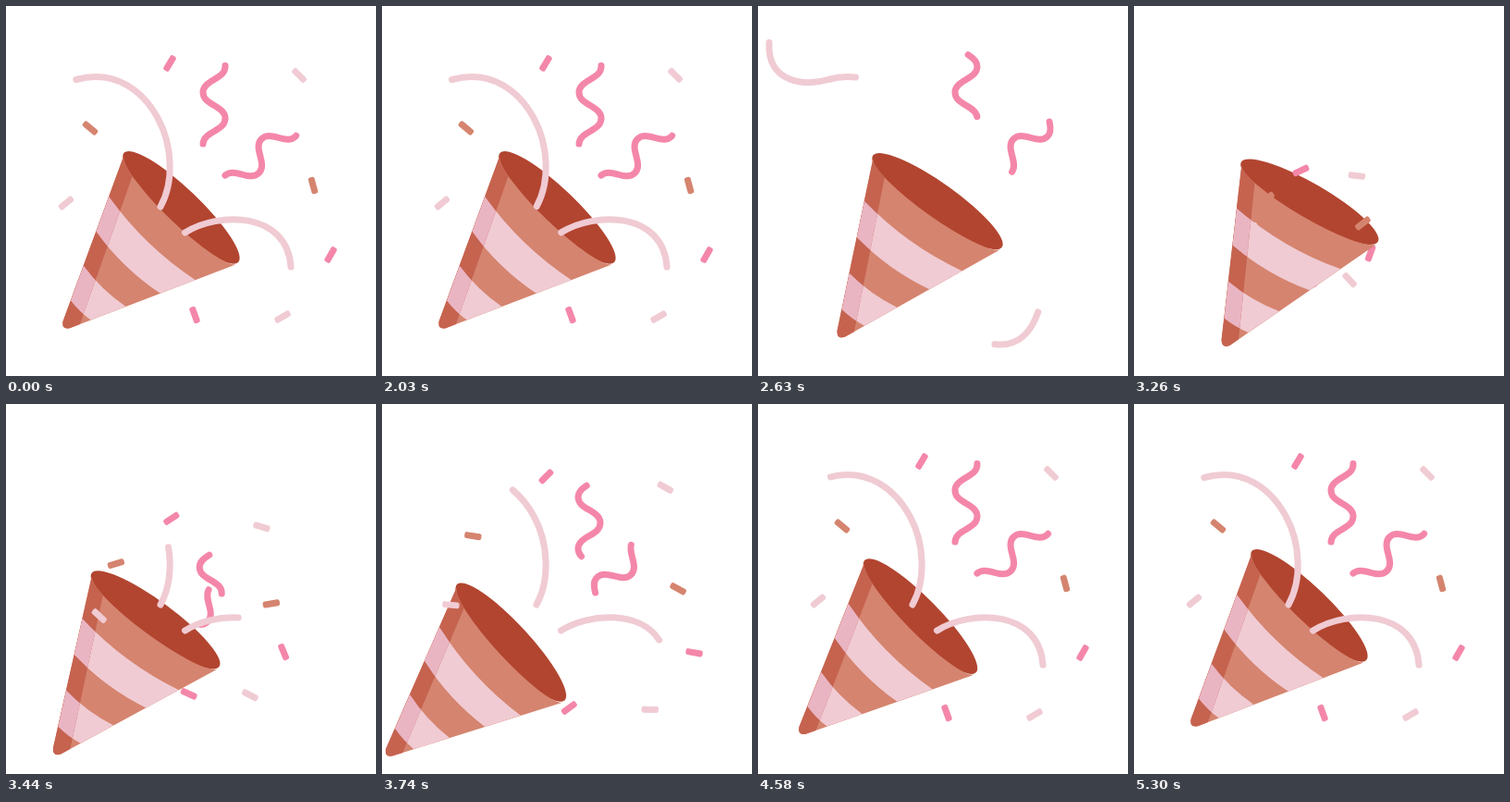
These frames come from a looping animation (400 by 400 pixels, 5330 ms). An HTML page:

```html
<!DOCTYPE html>
<html lang="en">
<head>
<meta charset="utf-8">
<title>Party popper</title>
<style>
  html, body { margin: 0; width: 100%; height: 100%; overflow: hidden; background: #fff; }
  svg { display: block; width: 100vw; height: 100vh; }
  .ribbon { fill: none; stroke-width: 7; stroke-linecap: round; stroke-linejoin: round; }
</style>
</head>
<body>
<svg viewBox="0 0 400 400">
  <defs>
    <clipPath id="body"><path d="M127.3 162 L61.5 341 Q60 350 69 348.3 L249 279.3 A85 16 43.8 0 1 127.3 162Z"/></clipPath>
    <clipPath id="side"><path d="M100 140 L152.2 140 L76 355 L40 355Z"/></clipPath>
    <path id="bands"/>
  </defs>
  <g class="cone"><ellipse cx="189.4" cy="217.8" rx="85.5" ry="19.8" transform="rotate(43.8 189.4 217.8)" fill="#b24530"/></g>
  <g id="mid"></g>
  <g class="cone">
    <g clip-path="url(#body)">
      <rect x="40" y="140" width="230" height="220" fill="#d5846f"/>
      <use href="#bands" fill="#f0cbd3"/>
      <g clip-path="url(#side)">
        <rect x="40" y="140" width="120" height="220" fill="#c5634f"/>
        <use href="#bands" fill="#eab5c3"/>
      </g>
    </g>
  </g>
  <g id="top"></g>
</svg>
<script>
const LOOP = 5330, EXIT = 2010, BURST = 3150;
const HOT = '#f487a9', PALE = '#f0cbd3', CLAY = '#d5846f';
const MOUTH = [183, 266];

const span = (t, a, b) => Math.max(0, Math.min(1, (t - a) / (b - a)));
const mix = (a, b, p) => a + (b - a) * p;
const smooth = u => u * u * (3 - 2 * u);
const easeOut = (u, n) => 1 - Math.pow(1 - u, n);
const settle = u => smooth(easeOut(u, 1.3));
// Distance still to fly and turn still to make after the burst
const flight = t => 0.57 * Math.pow((4500 - Math.min(t, 4500)) / 1240, 4);
const turn = t => Math.pow((4600 - Math.min(t, 4600)) / 1340, 2);

function add(parent, tag, attrs) {
  const el = document.createElementNS('http://www.w3.org/2000/svg', tag);
  for (const k in attrs) el.setAttribute(k, attrs[k]);
  document.getElementById(parent).appendChild(el);
  return el;
}

// Stripe edges: s is the share of the way from the tip to the rim
function edge(s) {
  const l = [61 + 66.3 * s, 343 - 181 * s], r = [67 + 182 * s, 349 - 69.7 * s];
  return { l, r, c: [(l[0] + r[0]) / 2 - 11 * s, (l[1] + r[1]) / 2 + 11.5 * s] };
}
document.getElementById('bands').setAttribute('d', [0.757, 0.344].map(s => {
  const a = edge(s), b = edge(s - 0.208);
  return `M${a.l} Q${a.c} ${a.r} L${b.r} Q${b.c} ${b.l}Z`;
}).join(' '));

function conePose(t) {
  const wind = smooth(span(t, EXIT, BURST));
  const kick = smooth(span(t, BURST, 3680)), back = settle(span(t, 3680, 5310));
  const tip = smooth(span(t, 3160, 3830)), level = settle(span(t, 3830, 5310));
  const x = 20 * wind - 73 * kick + 53 * back;
  const y = -2 * wind + 39.5 * kick - 37.5 * back;
  const angle = -14.8 * wind + 19.2 * tip - 4.4 * level;
  return `translate(${x} ${y}) rotate(${angle} 148 261)`;
}

// Show a window of a longer path: it grows to [a, b], later runs out at the end
function trim(el, a, b, enter, leave) {
  const total = el.getTotalLength();
  return t => {
    const into = t > 3240, p = into ? enter(t) : leave(t);
    const s = into ? a * p : mix(a, total, p);
    const e = into ? b * p : mix(b, total, p);
    el.style.display = e - s < 0.5 ? 'none' : '';
    el.setAttribute('stroke-dasharray', `${e - s} ${total * 2}`);
    el.setAttribute('stroke-dashoffset', -s);
  };
}

// Seven half waves; three of them are visible at rest
function squiggle(x, y, angle, enter) {
  let d = '';
  for (let i = -5; i <= 2; i++) {
    const px = i % 2 ? -24 : 0, py = -28 * i;
    d += i === -5 ? `M${px} ${py}` : `C${-24 - px} ${py + 14} ${px} ${py + 14} ${px} ${py}`;
  }
  const el = add('mid', 'path', { class: 'ribbon', stroke: HOT, d });
  const step = el.getTotalLength() / 7;
  const cut = trim(el, 2 * step, 5 * step, enter, t => Math.pow(span(t, EXIT, BURST), 2.6));
  return t => {
    const k = t > BURST ? 0.52 * flight(t) : 0;
    el.setAttribute('transform',
      `translate(${mix(x, MOUTH[0] + 30, k)} ${mix(y, MOUTH[1] - 30, k)}) rotate(${angle})`);
    cut(t);
  };
}

function streamer(rest, exit, enter, leave) {
  const el = add('top', 'path', { class: 'ribbon', stroke: PALE, d: rest });
  const len = el.getTotalLength();
  el.setAttribute('d', rest + exit);
  return trim(el, 0, len, enter, leave);
}

// The rest pose is the end of the flight; leaving pieces head just past the stage edge
function confetti(layer, color, x, y, angle, spin) {
  const el = add(layer, 'rect',
    { x: -9.2, y: -3.5, width: 18.4, height: 7, rx: 2.3, fill: color });
  const dx = x - 200, dy = y - 200, far = 209 / Math.max(Math.abs(dx), Math.abs(dy)) - 1;
  return t => {
    let px, py, r;
    if (t > BURST) {
      px = mix(x, MOUTH[0], flight(t));
      py = mix(y, MOUTH[1], flight(t));
      r = angle + spin * turn(t);
    } else {
      const p = Math.pow(Math.max(0, t - EXIT) / 620, 2);
      px = x + dx * far * p;
      py = y + dy * far * p;
      r = angle - spin * 0.3 * p;
    }
    el.style.display = t > 2900 && t < BURST ? 'none' : '';
    el.setAttribute('transform', `translate(${px} ${py}) rotate(${r})`);
  };
}

const parts = [
  squiggle(237, 65.5, 0, t => easeOut(span(t, 3260, 4430), 4)),
  squiggle(313, 141, 45, t => easeOut(span(t, 3260, 4700), 3.6)),
  confetti('mid', HOT, 177, 62, -59, 34),
  confetti('mid', PALE, 317, 75, 45, -38),
  confetti('mid', CLAY, 91, 132, 40, -75),
  confetti('mid', CLAY, 332, 194, 75, -113),
  confetti('mid', HOT, 351, 269, -60, 170),
  confetti('mid', PALE, 299, 336, -30, 77),
  confetti('mid', HOT, 204, 334, 70, 180),
  confetti('top', PALE, 65, 213, -40, 110),
  streamer('M167 217 C182 190 180 150 164 121 C148 92 118 68 76 79.5',
    'C52 87 10 84 12 40 S14 -20 22 -90',
    t => easeOut(span(t, 3260, 5200), 3.8), t => Math.pow(span(t, EXIT, 3060), 1.69)),
  streamer('M193.5 245 C230 222 304 222 308 282',
    'C311 325 296 368 260 366 S205 385 185 412',
    t => easeOut(span(t, 3260, 4700), 4), t => smooth(span(t, EXIT, 3160)))
];
const cones = document.querySelectorAll('.cone');

function draw(t) {
  const pose = conePose(t);
  cones.forEach(c => c.setAttribute('transform', pose));
  parts.forEach(part => part(t));
}

const start = performance.now();
function tick() {
  draw((performance.now() - start) % LOOP);
  requestAnimationFrame(tick);
}
draw(0);
requestAnimationFrame(tick);
</script>
</body>
</html>
```
